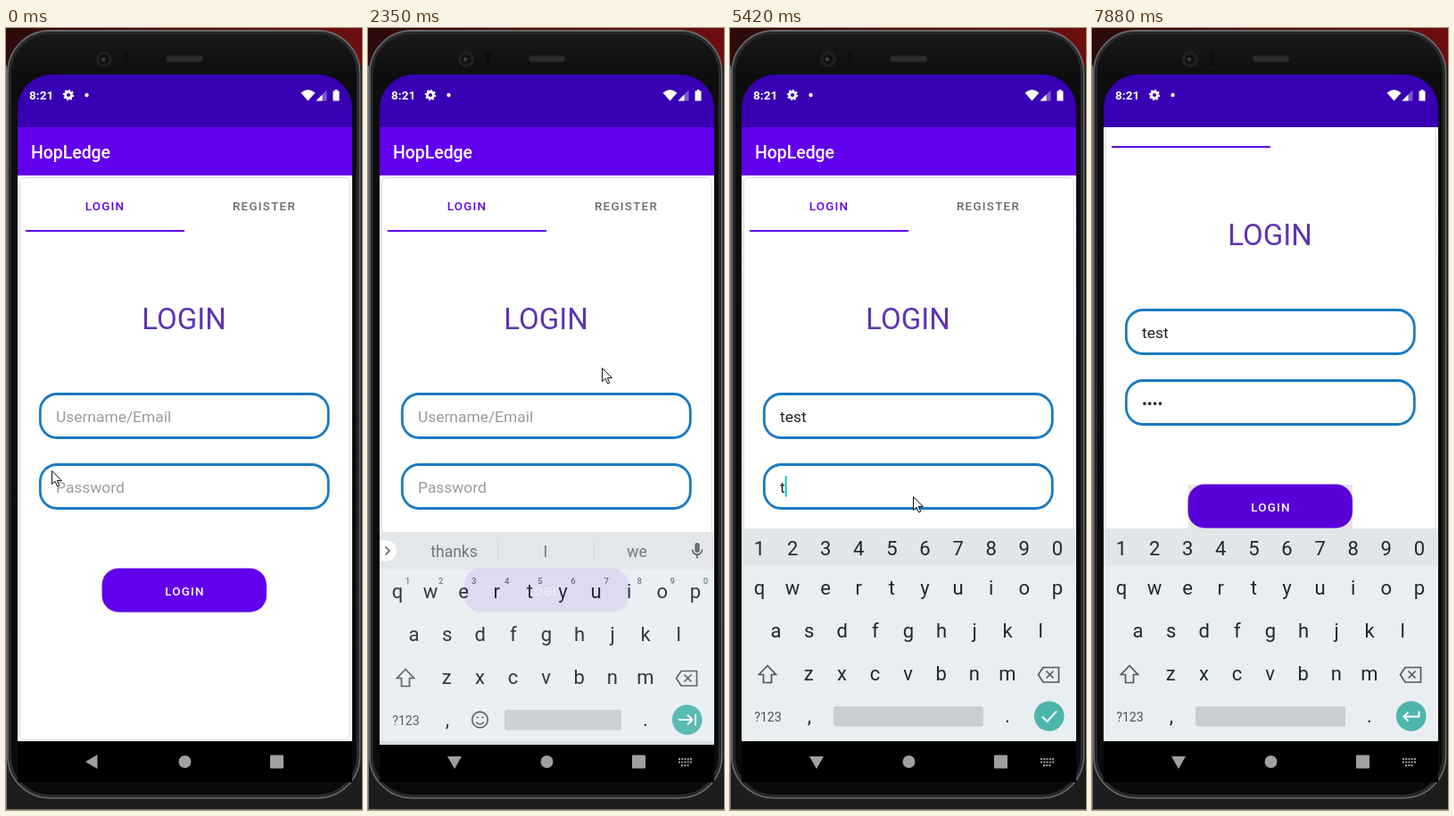
An HTML page for the animation above (8 s loop, 399 px wide and 875 px high).

```html
<!DOCTYPE html>
<html lang="en">
<head>
<meta charset="utf-8">
<title>Login screen</title>
<style>
html, body { margin: 0; width: 100%; height: 100%; overflow: hidden; background: #1b1b1c; }
svg { display: block; width: 100vw; height: 100vh; font-family: Roboto, sans-serif; }
.mid { text-anchor: middle; }
.caps { font-size: 13.4px; font-weight: 500; letter-spacing: 1.25px; text-anchor: middle; }
.field { fill: #fff; stroke: #1b7bc2; stroke-width: 2.8px; }
.entry { font-size: 17.4px; fill: #212121; }
.entry.hint { fill: #9b9b9b; }
.entry.composing { text-decoration: underline; }
.key { font-size: 22px; fill: #1c2a31; text-anchor: middle; }
.digit { font-size: 9.5px; fill: #66727a; text-anchor: middle; font-weight: 500; }
.word { font-size: 17.5px; fill: #626d73; text-anchor: middle; }
.line { fill: none; stroke: #4f5a60; stroke-width: 1.7px; }
.white { fill: none; stroke: #fff; stroke-width: 2px; }
</style>
</head>
<body>
<svg viewBox="0 0 399 875">
  <defs>
    <linearGradient id="red"><stop stop-color="#2c0a0b"/><stop offset="1" stop-color="#6e0e10"/></linearGradient>
    <linearGradient id="body" x2="0" y2="1">
      <stop stop-color="#1a1a1c"/><stop offset=".06" stop-color="#0d0d0e"/><stop offset="1" stop-color="#0a0a0b"/>
    </linearGradient>
    <clipPath id="screen"><path d="M13 844V90a38 38 0 0 1 38-38H350a38 38 0 0 1 38 38V844z"/></clipPath>
    <clipPath id="page"><path d="M13 111H388V798H13z"/></clipPath>
  </defs>

  <!-- desktop and phone -->
  <rect width="399" height="875" fill="#1d1d1e"/>
  <rect width="399" height="42" fill="url(#red)"/>
  <path d="M.5 42V874.500H399" fill="none" stroke="#77777a"/>
  <rect x="2" y="3" width="394.500" height="858.500" rx="47" fill="url(#body)" stroke="#68686b" stroke-width="1.800"/>
  <rect x="4.500" y="5.500" width="389.500" height="853.500" rx="44.500" fill="none" stroke="#2a2a2c" stroke-width="2.500"/>
  <circle cx="110" cy="35" r="9" fill="#202022"/>
  <circle cx="110" cy="35" r="5.500" fill="#111113"/>
  <circle cx="109" cy="35" r="2.200" fill="#3d3d42"/>
  <rect x="130" y="25" width="9" height="20" rx="3" fill="#0e0e0f" stroke="#18181a"/>
  <rect x="180" y="31" width="41" height="7" rx="3" fill="#2c2c2e" stroke="#202022"/>

  <g clip-path="url(#screen)">
    <path d="M13 798H388V844H13z"/>
    <path d="M13 52H388V111H13z" fill="#3700b3"/>
    <path d="M13 111H388V798H13z" fill="#fff"/>
  </g>

  <!-- status bar -->
  <g fill="#fff">
    <text x="26" y="80" font-size="13.6" font-weight="600">8:21</text>
    <circle cx="70" cy="75" r="3.500" fill="none" stroke="#fff" stroke-width="2.800"/>
    <circle cx="70" cy="75" r="5.100" fill="none" stroke="#fff" stroke-width="2.200" pathLength="16" stroke-dasharray="1"/>
    <circle cx="90.500" cy="75" r="2.200"/>
    <path d="M330.500 72.500Q338.500 65.500 346.500 72.500L338.500 81.500z"/>
    <path d="M347.500 81.500L359.500 69.500V81.500z" opacity=".35"/>
    <path d="M347.500 81.500L354.500 74.500V81.500z"/>
    <path d="M366.500 70.500H368.500V69H371.500V70.500H373.500V81.500H366.500z"/>
  </g>

  <!-- app page -->
  <g clip-path="url(#page)"><g id="content">
    <path d="M13 111H388V165H13z" fill="#6200ee"/>
    <text x="28" y="146" font-size="19.4" font-weight="500" fill="#fff">HopLedge</text>
    <rect x="15.500" y="167.500" width="369.500" height="629" rx="5" fill="#fff" stroke="#dcdcde"/>
    <text class="caps" x="111" y="204" fill="#6200ee">LOGIN</text>
    <text class="caps" x="289.500" y="204" fill="#6a6a6a">REGISTER</text>
    <path d="M22 226H200V228H22z" fill="#6200ee"/>
    <text class="mid" x="199.500" y="337" font-size="33" fill="#5e35b1">LOGIN</text>
    <rect class="field" x="38.300" y="409.500" width="323" height="49" rx="19"/>
    <rect class="field" x="38.300" y="488.500" width="323" height="49" rx="19"/>
    <text class="entry" id="user" x="56" y="441"></text>
    <text class="entry" id="pass" x="56" y="519.500"></text>
    <rect id="caret" width="2" height="23.500" fill="#10cdbb"/>
    <rect id="halo" x="108" y="605" width="184" height="49" fill="#e4e4e6"/>
    <rect x="108" y="606" width="184" height="48.500" rx="18.500" fill="#dfdde6"/>
    <rect id="button" x="107.500" y="604.500" width="184.500" height="49" rx="18.500"/>
    <text class="caps" x="200.500" y="634.500" fill="#fff">LOGIN</text>
  </g></g>
  <path id="edge" d="M89 795.500H363" stroke="#e3e5e7"/>

  <!-- navigation bar -->
  <g fill="#a0a0a0">
    <path id="back"/>
    <circle cx="200.500" cy="821" r="7"/>
    <rect x="296" y="813.500" width="15" height="15" rx="1"/>
    <path id="switcher" fill="none" stroke="#a0a0a0" stroke-width="2"
      d="M348 818H363M348 821.500H363M351 825H360" stroke-dasharray="2 1.250"/>
  </g>

  <!-- on-screen keyboard -->
  <g id="keyboard">
    <path d="M13 560H388V798H13z" fill="#e9eef1"/>
    <path d="M13 560H388V601.500H13z" fill="#e1e6e9"/>
    <g id="strip">
      <path d="M13 569.500H20.500a11.500 11.500 0 0 1 0 23H13z" fill="#fff"/>
      <path class="line" d="M19.500 576.500l4.500 4.500-4.500 4.500"/>
      <path d="M145.500 569.500V592M253.500 569.500V592" stroke="#ccd2d5"/>
      <text class="word" x="96.500" y="587.500"></text>
      <text class="word" x="199" y="587.500"></text>
      <text class="word" x="301.500" y="587.500"></text>
      <rect x="366.300" y="572" width="5.400" height="11" rx="2.700" fill="#56616a"/>
      <path class="line" d="M363.500 579.500a5.500 5.800 0 0 0 11 0M369 585.500V589.500"/>
      <g id="digits"></g>
      <path class="line" d="M116.700 770a8.800 8.800 0 1 1 17.600 0a8.800 8.800 0 1 1-17.600 0M121 772.500q4.500 5 9 0M121.500 767.500h2.200M127.300 767.500h2.200"/>
    </g>
    <g id="numbers"></g>
    <g id="letters"></g>
    <path class="line" d="M42 713.500L32.500 723.500H37.500V732.500H46.500V723.500H51.500z"/>
    <path class="line" d="M345.500 723.500L351 715.500H368.500V732H351zM354.500 719.500l8 8M362.500 719.500l-8 8"/>
    <text class="mid" x="42.500" y="775.500" font-size="14.2" fill="#47535a">?123</text>
    <text class="key" x="89" y="777" font-size="20">,</text>
    <text class="key" x="311" y="777" font-size="20">.</text>
    <rect id="space" y="759" height="22.500" rx="2.500" fill="#c9ced1"/>
    <circle cx="357.700" cy="770" r="16.800" fill="#4db6ac"/>
    <path class="white" id="action"/>
  </g>

  <path id="cursor" d="M.5.5V15.500L4 12.200L6.600 18L8.800 17L6.300 11.500H11.300z" fill="#fff" stroke="#111"/>
</svg>
<script>
const $ = id => document.getElementById(id);
const LOOP = 8000, PITCH = 37.1;

const row = (chars, x, y, cls = 'key') => [...chars]
  .map((c, i) => `<text class="${cls}" x="${x + PITCH * i}" y="${y}">${c}</text>`).join('');
$('letters').innerHTML = row('qwertyuiop', 33, 633.5) + row('asdfghjkl', 51.5, 681.5) + row('zxcvbnm', 88.3, 729.5);
$('digits').innerHTML = row('1234567890', 44.5, 618, 'digit');
$('numbers').innerHTML = row('1234567890', 33, 589.5);
const words = document.querySelectorAll('.word');

// Each track holds a value from its start time until the next entry.
const cursorTrack = [
  [0, 51, 495], [120, 50, 495], [390, 43, 491], [820, 33, 479],
  [970, 15, 490], [1090, 70, 548], [1210, 250, 540], [1330, 376, 490], [1450, 290, 420], [1570, 181, 417],
  [1720, 178, 416], [1990, 205, 402], [2110, 250, 384], [2230, 262, 380],
  [4140, 244, 440], [4260, 212, 542], [4380, 202, 530], [4530, 202, 526], [4680, 205, 524],
  [6470, 222, 590], [6590, 236, 662], [6860, 310, 745], [6980, 387, 824], [7100, 368, 786], [7250, 367, 782],
  [7640, 387, 740], [7760, 420, 700]
];
const userTrack = [[0, ''], [3160, 'te'], [3310, 'tes'], [3460, 'test']];
const passTrack = [[0, ''], [5420, 't'], [5540, '•e'], [5790, '••s'], [5940, '•••t'], [7400, '••••']];
const wordTrack = [
  [0, 'thanks', 'I', 'we'], [3010, 'the', 'to', 'there'], [3160, 'te', 'ten', 'tell'],
  [3310, 'tes', 'tea', 'test'], [3460, 'test', 'testing', 'tests']
];
const panTrack = [[0, 0], [7400, 18], [7520, 77], [7640, 91], [7760, 94]];
const caretFlips = [1870, 2350, 2870, 3990, 4530, 5110, 5420, 6470, 6980, 7400];
const icons = {
  next: 'M348 770H363M358 764.500L363.500 770L358 775.500M367 763.500V776.500',
  done: 'M350 770.500L355.500 776L366 764.500',
  enter: 'M366.500 764.500V770.500H349.500M354.500 765.500L349.500 770.500L354.500 775.500'
};

const at = (track, t) => track.findLast(entry => entry[0] <= t).slice(1);
const show = (id, on) => $(id).style.display = on ? '' : 'none';
const move = (id, x, y) => $(id).setAttribute('transform', `translate(${x} ${y})`);

function setEntry(id, text, hint, composing) {
  $(id).textContent = text || hint;
  $(id).classList.toggle('hint', !text);
  $(id).classList.toggle('composing', !!text && composing);
}

function render(t) {
  const onPass = t >= 4680, open = t >= 2230;
  const [user] = at(userTrack, t), [pass] = at(passTrack, t), [pan] = at(panTrack, t);

  move('cursor', ...at(cursorTrack, t));
  move('content', 0, -pan);
  setEntry('user', user, 'Username/Email', !onPass);
  setEntry('pass', pass, 'Password', false);

  const active = onPass ? pass : user;
  const width = active ? $(onPass ? 'pass' : 'user').getComputedTextLength() : 0;
  $('caret').setAttribute('x', 56 + width);
  $('caret').setAttribute('y', onPass ? 501 : 422.5);
  show('caret', caretFlips.filter(f => f <= t).length % 2);
  show('halo', pan);
  $('button').setAttribute('fill', pan ? '#5900d8' : '#6200ee');

  $('back').setAttribute('d', open ? 'M89 815H105L97 829z' : 'M89 821L102.500 813V829z');
  show('switcher', open);
  show('edge', open && t < 2350);

  show('keyboard', t >= 2350);
  const settled = t >= 2470;
  move('keyboard', 0, settled ? 0 : 4);
  $('keyboard').setAttribute('opacity', settled ? 1 : 0.92);
  show('strip', !onPass);
  show('numbers', onPass);
  at(wordTrack, t).forEach((w, i) => words[i].textContent = w);
  $('space').setAttribute('x', onPass ? 116 : 153);
  $('space').setAttribute('width', onPass ? 168 : 131);
  $('action').setAttribute('d', pan ? icons.enter : onPass ? icons.done : icons.next);
}

const start = performance.now();
function tick() {
  render((performance.now() - start) % LOOP);
  requestAnimationFrame(tick);
}
tick();
</script>
</body>
</html>
```
